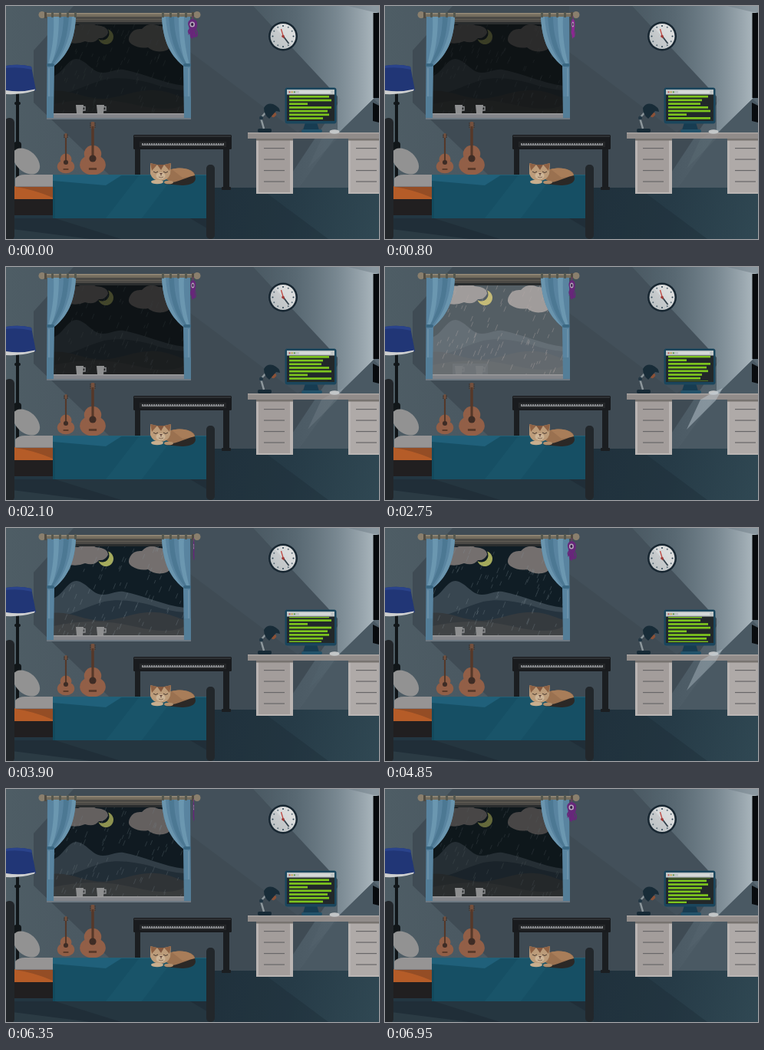
Animation, 486 px wide and 304 px high, one loop 7 s. Source, as an HTML page with a canvas:

```html
<!DOCTYPE html>
<html>
<head>
<meta charset="utf-8">
<style>
html, body { margin: 0; width: 100%; height: 100%; overflow: hidden; background: #434f58; }
canvas { display: block; width: 486px; height: 304px; }
</style>
</head>
<body>
<canvas id="stage" width="486" height="304"></canvas>
<script>
const LOOP = 7000;
const view = document.getElementById('stage').getContext('2d');
let c = view;

function rect(x, y, w, h, fill) { c.fillStyle = fill; c.fillRect(x, y, w, h); }
function round(x, y, w, h, r, fill) {
  c.beginPath(); c.roundRect(x, y, w, h, r); c.fillStyle = fill; c.fill();
}
function oval(x, y, rx, ry, fill, turn = 0) {
  c.beginPath(); c.ellipse(x, y, rx, ry, turn, 0, 7); c.fillStyle = fill; c.fill();
}
function shape(d, fill) { c.fillStyle = fill; c.fill(new Path2D(d)); }
function line(d, stroke, width = 1) {
  c.strokeStyle = stroke; c.lineWidth = width; c.stroke(new Path2D(d));
}
function ramp(x0, y0, x1, y1, ...stops) {
  const g = c.createLinearGradient(x0, y0, x1, y1);
  stops.forEach(([at, col]) => g.addColorStop(at, col));
  return g;
}
function layer(draw) {
  const el = document.createElement('canvas');
  el.width = 486; el.height = 304;
  c = el.getContext('2d');
  draw();
  c = view;
  return el;
}
// linear interpolation through [time, value] pairs
function track(keys, t) {
  for (let i = 1; i < keys.length; i++) {
    const [a, u] = keys[i - 1], [b, v] = keys[i];
    if (t <= b) return u + (v - u) * (t - a) / (b - a);
  }
  return keys[keys.length - 1][1];
}

function wall() {
  rect(0, 0, 486, 304, ramp(0, 0, 486, 0, [0, '#4e5d65'], [.2, '#4b5962'], [.6, '#46545d'], [.75, '#4a5963'], [1, '#596872']));
  shape('M88 0H322L436 122L360 237H152L36 126V58Z', '#3f4b54');
  shape('M240 0H322L436 122L380 165L240 60Z', 'rgba(76,92,102,.3)');
  // light from the right
  shape('M322 0H486V8L479 10V121L432 167V118Z', ramp(322, 0, 479, 0,
    [0, 'rgba(90,107,117,.15)'], [.35, 'rgba(104,121,131,.45)'], [.7, 'rgba(134,149,158,.75)'], [1, '#a9b5bc']));
  shape('M446 0H486V8H479Z', 'rgba(110,124,133,.5)');
  shape('M479 121L486 128V240H380L432 167Z', '#4a5963');
  rect(478.5, 9, 8, 111, '#070a0d');
  shape('M478 126L486 130V152L478 150Z', '#080b0e');
  // floor
  rect(0, 237, 486, 67, ramp(250, 240, 486, 304, [0, '#233641'], [.5, '#263b47'], [1, '#304853']));
  shape('M272 237H330L420 304H272Z', 'rgba(24,38,48,.3)');
  shape('M0 277H272V304H0Z', '#202e38');
  shape('M64 277H240L272 296V304H150Z', '#253640');
  shape('M0 290L110 304H0Z', '#2b3b44');
}

function curtain() {
  shape('M54 13H91C90 40 83 62 63 78L62 147H53Z', '#5984a0');
  shape('M62 13H69C69 38 66 61 59 76H55C61 55 63 34 62 13Z', '#6b97b0');
  shape('M75 13H82C80 43 74 60 62 75H59C69 57 75 37 75 13Z', '#4c7893');
  shape('M86 13H91C90 40 83 62 63 78C77 59 85 38 86 13Z', '#6a95ae');
  line('M56 81V118', '#7095ab', 1.5);
  rect(53, 118, 9, 29, '#547e98');
  round(53, 75, 10, 4, 2, '#3b6883');
}

function windowFrame() {
  rect(62, 14, 170, 8, '#4b4945');
  rect(62, 17, 170, 1, '#605c54');
  rect(62, 21, 170, 3, '#292c2d');
  rect(54, 140, 186, 7, '#83858a');
  rect(54, 140, 186, 1.5, '#9a9a9c');
  curtain();
  c.save(); c.translate(294, 0); c.scale(-1, 1); curtain(); c.restore();
  rect(53, 146, 188, 2, '#6d7983');
  rect(49, 9, 198, 5, '#746d5e');
  rect(49, 9, 198, 1.5, '#958b78');
  for (let x = 60; x < 240; x += x === 90 ? 114 : 10) round(x - 1, 8, 3, 7, 1, '#555850');
  oval(47, 11.5, 4.5, 4.5, '#8a7f6d');
  oval(249, 11.5, 4.5, 4.5, '#8a7f6d');
  rect(50, 8, 3, 8, '#514c43');
  rect(242, 8, 3, 8, '#514c43');
}

function clock() {
  oval(361, 39.5, 19, 19, '#172631');
  oval(361, 39.5, 16.5, 16.5, ramp(352, 48, 370, 31, [0, '#c0c5c7'], [.5, '#c8cbcd'], [.51, '#d5d8d9'], [1, '#dcdddd']));
  for (let i = 0; i < 12; i++) {
    const a = i * Math.PI / 6;
    oval(361 + Math.sin(a) * 13.5, 39.5 - Math.cos(a) * 13.5, 1, 1, i % 3 ? '#5b6d78' : '#2b4252');
  }
  line('M361 39L368.5 49', '#33414a', 1.8);
  line('M358.5 30L362 42', '#bd4740', 1.3);
  oval(361, 39.5, 1.8, 1.8, '#a33b38');
}

function guitar(x, top, y, s) {
  rect(x - 1.5 * s, top + 5, 3 * s, y - top, '#5f4030');
  round(x - 2.5 * s, top, 5 * s, 9 * s, 1.5, '#74503d');
  for (const k of [-1, 1]) for (let i = 0; i < 3; i++) oval(x + k * 3 * s, top + 2 + i * 2.5 * s, .8, .7, '#3c3029');
  const low = y + 8 * s;
  oval(x, y - 6 * s, 11 * s, 11 * s, '#925f47');
  oval(x, low, 16.5 * s, 13 * s, '#925f47');
  rect(x - 9 * s, y - 6 * s, 18 * s, 10 * s, '#925f47');
  rect(x - 1.5 * s, top + 6, 3 * s, y - top - 7 * s, '#553829');
  oval(x, y, 4.5 * s, 4.5 * s, '#3e2c25');
  rect(x - 5 * s, low + 4 * s, 10 * s, 2.5 * s, '#553728');
}

function piano() {
  rect(168, 186, 7, 36, '#1b1e21');
  rect(283, 186, 8, 52, '#1b1e21');
  round(281, 236, 12, 4, 1, '#1b1e21');
  round(166, 168, 128, 19, 1.5, '#191b1e');
  rect(167, 169, 126, 2, '#2d3033');
  rect(174, 177, 113, 7, '#242628');
  rect(177, 179, 107, 3, '#85878a');
  for (let x = 179; x < 284; x += 3) rect(x, 179, 1, 1.7, '#292c2f');
}

function cat() {
  oval(226, 221, 20, 9.5, '#9a7150');
  shape('M216 213C230 209 244 213 246 222L230 224Z', '#a87d59');
  shape('M246 221C250 230 241 234 229 234L205 232C220 232 230 225 246 221Z', '#2b2826');
  shape('M188 205L196 207H207L215 205L214 219Q211 228 201 228Q191 228 188 219Z', '#bc9c7a');
  shape('M188 205L197 207L190 215Z', '#8e6245');
  shape('M215 205L206 207L213 215Z', '#8e6245');
  shape('M197 207H206L202 214Z', '#82583f');
  oval(201.5, 221.5, 6, 4.5, '#cdb597');
  line('M192 216Q195 219 198 216M205 216Q208 219 211 216', '#473a31', 1);
  shape('M200 218H204L202 220.5Z', '#5e4037');
  line('M202 220V222M199 223Q202 225 205 223', '#6a5140', .7);
  oval(197, 229.5, 8, 2.7, '#c8ae8e');
  oval(212, 230, 6, 2.3, '#b28f6d');
}

function bed() {
  rect(11, 235, 50, 18, '#b55c28');
  shape('M12 236Q35 239 61 250V236Z', '#944d25');
  rect(11, 252, 50, 21, '#211f20');
  rect(12, 234, 49, 2, '#7d7c80');
  oval(26.5, 202.5, 20.5, 13.5, '#929292', .75);
  rect(61, 220, 200, 57, '#164f64');
  shape('M174 220H220L177 277H130Z', '#195469');
  shape('M61 220H152L130 234L61 228Z', '#20607a');
  rect(61, 236, 3, 41, '#124a5d');
  shape('M12 225Q16 220 25 220H61V235H12Z', '#969494');
  rect(61, 220, 200, 1, '#246075');
  round(-2, 146, 13, 160, 6, '#22262a');
  round(261, 207, 11, 97, 5, '#22272b');
}

function floorLamp() {
  rect(13, 112, 4, 136, '#111619');
  round(10, 177, 10, 12, 4, '#111619');
  round(11, 125, 8, 4, 2, '#111619');
  shape('M0 78Q17 75 33 79L39 110Q18 114 0 111Z', '#213676');
  shape('M0 78Q17 75 33 79L34 83Q17 79 0 81Z', '#2a438b');
  shape('M0 110Q20 113 38 108.5L37 110.5Q20 116 0 115Z', '#cfd0d0');
}

function cabinet(x, face) {
  rect(x, 173, 48, 72, '#bab5b3');
  rect(x + 3, 175, 41, 68, face);
  for (let i = 0; i < 4; i++) rect(x + 10, 185 + i * 14.5, 27, 1.2, '#686768');
  rect(x, 173, 48, 2.5, '#77736f');
}

function desk() {
  cabinet(326, '#a39d9b');
  cabinet(446, '#afaaa8');
  rect(315, 165, 171, 8, '#918c8a');
  rect(315, 165, 171, 1.5, '#a9a4a1');
  round(328, 160, 18, 5, 2, '#172a36');
  line('M336 160L332 146L342 135', '#8d979c', 2.5);
  oval(332.5, 146, 2.5, 2.5, '#223744');
  oval(349, 142, 3.5, 2.5, '#8a5238', -.7);
  shape('M336 133Q340 126 348 128Q357 132 357 138L352 137L343 147Q336 142 336 133Z', '#182c38');
  shape('M390 152H405L408 162H387Z', '#173c51');
  round(385, 161, 27, 4, 2, '#22526a');
  round(363.5, 106.5, 67, 47, 3, '#1b465d');
  rect(366, 109, 62, 41, '#22282a');
  rect(366, 109, 62, 6.5, '#c1c7c7');
  ['#c75148', '#d2a63e', '#609b48'].forEach((col, i) => oval(369.5 + i * 3.2, 112.3, 1.1, 1.1, col));
  rect(382, 111, 41, 2.5, '#dadddd');
  oval(428, 164, 6.5, 2.7, '#c3c6c7');
}

const back = layer(wall);
const room = layer(() => {
  windowFrame(); clock(); floorLamp(); guitar(78, 166, 204, .68);
  guitar(113, 151, 199, 1.02); piano(); bed(); cat(); desk();
});

let seed = 19;
const rnd = () => (seed = seed * 16807 % 2147483647) / 2147483647;
const drops = Array.from({ length: 150 }, () => ({ x: rnd() * 210, y: rnd(), n: 8 + Math.floor(rnd() * 5), len: 4 + rnd() * 4 }));

const shade = [[0, .68], [1450, .72], [2250, .62], [2550, .15], [2700, 0], [6000, 0], [6950, .42], [7000, .65]];
const flash = [[0, 0], [2500, 0], [2680, 1], [2820, 1], [3050, 0], [7000, 0]];
const beam = [[0, .03], [1450, .06], [2300, .15], [2700, .5], [3000, .42], [3800, 0], [4300, .05], [4800, .4], [5200, .25], [5650, 0], [7000, .03]];
const spin = [[0, 0], [1450, .57], [2750, 1.13], [3900, 1.73], [4850, 2.07], [5700, 2.5], [7000, 3]];

function mug(x) {
  line(`M${x + 9} 131.5H${x + 12}V136H${x + 9}`, '#8e9092', 1.4);
  shape(`M${x} 129H${x + 10}L${x + 9} 140H${x + 1}Z`, '#8e8f90');
}

function outside(t) {
  const dark = track(shade, t), lit = track(flash, t), p = t / LOOP;
  c.save();
  c.beginPath(); c.rect(61, 23, 172, 117); c.clip();
  rect(61, 23, 172, 117, '#101d25');
  shape('M61 92C74 88 80 69 92 69C106 71 112 87 126 87C138 87 142 82 153 83C180 88 205 101 233 104V140H61Z', '#384650');
  shape('M61 118C84 114 104 103 128 96C150 92 170 96 190 101C205 106 218 109 233 110V140H61Z', '#25333e');
  shape('M61 111C83 108 101 121 127 121C151 119 172 108 195 110C212 111 222 117 233 120V140H61Z', '#353a3e');
  shape('M61 128Q115 116 165 128T233 128V140H61Z', '#404345');
  rect(61, 23, 172, 117, `rgba(130,137,142,${lit * .6})`);
  shape('M120.5 43A10 10 0 1 0 133 30.5A9 9 0 0 1 120.5 43Z', lit > .5 ? '#c4ba77' : '#a5ab5c');
  const cloud = lit > .5 ? '#a09c9b' : '#746f6e';
  shape('M80 47Q72 42 77 34Q83 23 94 25Q107 18 117 25Q133 26 133 35Q129 43 121 42Q115 50 103 46Q91 51 80 47Z', cloud);
  shape('M164 50Q157 45 162 37Q166 29 177 30Q186 20 199 26Q214 26 217 40Q218 57 205 59Q193 61 185 54Q174 56 164 50Z', cloud);
  c.globalAlpha = .34 + lit * .12;
  c.beginPath();
  for (const d of drops) {
    const y = 14 + (d.y + p * d.n) % 1 * 136, x = 50 + d.x - (y - 14) * .15;
    c.moveTo(x, y); c.lineTo(x - d.len * .4, y + d.len);
  }
  c.strokeStyle = lit > .5 ? '#b4aaa7' : '#8a969e'; c.lineWidth = .8; c.stroke();
  c.globalAlpha = 1;
  rect(61, 23, 172, 117, `rgba(13,15,15,${dark})`);
  mug(91); mug(118);
  rect(88, 126, 46, 14, `rgba(112,118,122,${lit * .75})`);
  c.restore();
}

const rows = [52, 55, 24, 55, 50, 52, 44, 42];
function code(t) {
  c.save();
  c.beginPath(); c.rect(367, 116, 60, 33); c.clip();
  const step = 4.7, shift = t / LOOP * 44, first = Math.floor(shift);
  for (let i = 0; i < 9; i++)
    rect(369, 117 + (i - shift + first) * step, rows[(first + i) % rows.length], 2.7, '#7dc51e');
  c.restore();
}

function charm(t) {
  const turn = track(spin, t) * Math.PI * 2, w = Math.cos(turn);
  c.save();
  c.translate(244.5 - w * 1.3, 14);
  line('M0 -1V5', '#713b78', 1);
  c.scale(Math.max(.14, Math.abs(w)), 1);
  const body = w < -.2 && t < 3000 ? '#8d2892' : '#67277a';
  shape('M-6 10C-7 1 7 1 6 10Q6 16 3 18L5 25Q3 29 1 26L0 29L-3 27L-4 22L-6 24L-4 17Z', body);
  line('M-4 16Q-7 20 -4 22M3 16Q8 21 5 26M0 17V27', body, 1.6);
  oval(-.5, 10, 3.3, 3.5, '#b8a8bd');
  oval(-.5, 10, 1.7, 2, '#332044');
  c.restore();
}

function draw(t) {
  c.drawImage(back, 0, 0);
  outside(t);
  c.drawImage(room, 0, 0);
  code(t);
  charm(t);
  shape('M440 158L431 174L393 212L411 173L425 165Z', `rgba(190,202,209,${track(beam, t)})`);
}

function tick(now) {
  draw(now % LOOP);
  requestAnimationFrame(tick);
}
draw(0);
requestAnimationFrame(tick);
</script>
</body>
</html>
```
